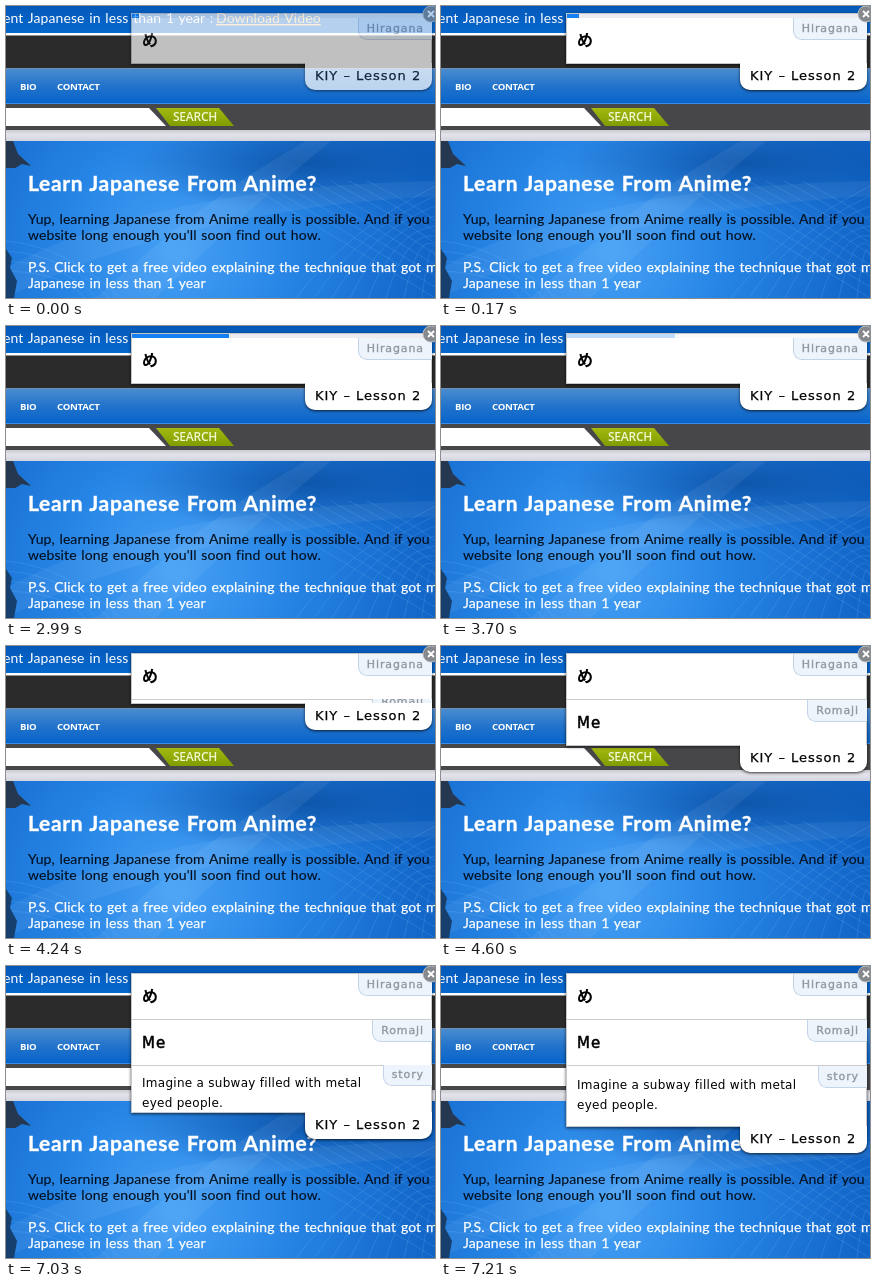
Recreate the animation shown at these times as an HTML page. Size 429x292 px, loop 8 s.

```html
<!DOCTYPE html>
<html lang="en">
<head>
<meta charset="utf-8">
<title>Flashcard popup</title>
<style>
html, body { margin: 0; width: 100%; height: 100%; overflow: hidden; }
#stage { position: relative; width: 429px; height: 292px; overflow: hidden; background: #2b2b2b; }
svg { position: absolute; left: 0; top: 0; }
.body { font: 14px Lato, sans-serif; letter-spacing: .1px; word-spacing: 1px; }
.nav { font: 700 9.6px "Open Sans", sans-serif; letter-spacing: -.25px; }

#popup { position: absolute; left: 125px; top: 7px; width: 301px; font-family: "DejaVu Sans", sans-serif; }
#card { padding: 1px 0 1px 1px; background: #fff; box-shadow: 0 1px 3px #000a, inset 0 0 0 1px #c4c8cc; }
#track { background: #ececf0; }
#bar { height: 100%; background: #1480f2; }
.row { position: relative; overflow: hidden; height: 45px; }
.row + .row { box-shadow: inset 0 1px #ccc; }
.row > div { position: absolute; inset: 0; }
.label { position: absolute; right: 0; top: 0; height: 21px; padding: 0 8px; border: solid #c3d3e8;
  border-width: 0 0 1px 1px; border-radius: 0 0 0 9px; background: #edf4fc; color: #92969e;
  font-size: 11px; line-height: 22px; letter-spacing: .9px; -webkit-text-stroke: .35px; }
.row + .row .label { top: 1px; }
.word { position: absolute; left: 10px; top: 14px; font-size: 15px; line-height: 20px; letter-spacing: 1px; -webkit-text-stroke: .5px; }
.kana { top: 11px; font: 700 16px/20px "Noto Sans CJK JP", "Noto Sans CJK", sans-serif; -webkit-text-stroke: 0; }
.story { position: absolute; left: 10px; top: 10px; font-size: 12px; line-height: 20px; letter-spacing: .28px; white-space: nowrap; }
#tab { position: relative; margin: -1px 0 0 174px; width: 127px; height: 27px; background: #fff; border-radius: 0 0 10px 10px;
  box-shadow: 0 1px 3px #000b; clip-path: inset(0 -5px -5px); box-sizing: border-box; padding-left: 10px;
  font-size: 13px; line-height: 25px; letter-spacing: 1px; white-space: nowrap; -webkit-text-stroke: .25px; }
#close { left: 291px; top: -8px; }
</style>
</head>
<body>
<div id="stage">
  <svg width="429" height="292">
    <defs>
      <linearGradient id="top" x2="0" y2="1"><stop stop-color="#0459b8"/><stop offset="1" stop-color="#0768cf"/></linearGradient>
      <linearGradient id="menu" x2="0" y2="1"><stop stop-color="#4a8bd0"/><stop offset=".5" stop-color="#2273cb"/><stop offset="1" stop-color="#0764cb"/></linearGradient>
      <linearGradient id="strip" x2="0" y2="1"><stop stop-color="#c9c9d0"/><stop offset=".4" stop-color="#e3e3ea"/><stop offset="1" stop-color="#d2d4de"/></linearGradient>
      <linearGradient id="green" x2="0" y2="1"><stop stop-color="#a3b911"/><stop offset="1" stop-color="#7f9c00"/></linearGradient>
      <radialGradient id="sky" gradientUnits="userSpaceOnUse" cx="170" cy="245" r="270">
        <stop stop-color="#45a0f5"/><stop offset=".45" stop-color="#2583e4"/><stop offset="1" stop-color="#0f62c4"/>
      </radialGradient>
      <radialGradient id="shade"><stop stop-color="#084a9c" stop-opacity=".75"/><stop offset="1" stop-color="#084a9c" stop-opacity="0"/></radialGradient>
    </defs>
    <rect width="429" height="27" fill="url(#top)"/>
    <rect y="27" width="429" height="2.5" fill="#fff"/>
    <rect y="63" width="429" height="34" fill="url(#menu)"/>
    <rect y="62" width="429" height="1" fill="#6d8fb5"/>
    <rect y="97" width="429" height="1" fill="#3a8ee6"/>
    <rect y="98" width="429" height="26" fill="#474649"/>
    <path d="M0 102H143L160 120H0Z" fill="#fff"/>
    <path d="M150 102H213L228 120H164Z" fill="url(#green)"/>
    <rect y="124" width="429" height="11" fill="url(#strip)"/>

    <rect y="135" width="429" height="157" fill="url(#sky)"/>
    <svg y="135" width="429" height="157"><ellipse cx="300" cy="22" rx="180" ry="48" fill="url(#shade)"/></svg>
    <g fill="#fff" fill-opacity=".06">
      <path d="M0 262Q150 180 429 175V190Q170 205 0 292Z"/>
      <path d="M90 292Q200 190 300 135H325Q240 205 150 292Z"/>
    </g>
    <g id="arcs" fill="none" stroke="#8cc6ff" stroke-opacity=".17"/>
    <path d="M0 135H7L12 148 25 160 16 158 9 162 0 162Z" fill="#26384f"/>
    <path d="M0 243L6 252 4 262 11 275 8 292H0Z" fill="#173f6e"/>

    <g class="body" fill="#fff">
      <text x="-3" y="17">ent Japanese in less than 1 year :</text>
      <text x="210" y="17" fill="#f6cf8b" text-decoration="underline">Download Video</text>
      <g stroke="#fff" stroke-width=".25">
        <text x="22" y="266">P.S. Click to get a free video explaining the technique that got me</text>
        <text x="22" y="282">Japanese in less than 1 year</text>
      </g>
      <g fill="#04101f" stroke="#04101f" stroke-width=".15">
        <text x="22" y="218">Yup, learning Japanese from Anime really is possible. And if you</text>
        <text x="22" y="234">website long enough you'll soon find out how.</text>
      </g>
      <text x="22" y="185" stroke="#fff" stroke-width=".4" style="font-weight:700;font-size:21px;letter-spacing:.65px">Learn Japanese From Anime?</text>
    </g>
    <g class="nav" fill="#fff">
      <text x="14" y="84">BIO</text>
      <text x="51" y="84">CONTACT</text>
      <text x="167" y="115" fill="#f4f7d2" style="font-weight:600;font-size:12px">SEARCH</text>
    </g>
  </svg>

  <div id="popup">
    <div id="card">
      <div id="track"><div id="bar"></div></div>
      <div class="row"><div><span class="word kana">め</span><span class="label">Hiragana</span></div></div>
      <div class="row" id="romaji"><div><span class="word">Me</span><span class="label">Romaji</span></div></div>
      <div class="row" id="story"><div><span class="story">Imagine a subway filled with metal<br>eyed people.</span><span class="label">story</span></div></div>
    </div>
    <div id="tab">KIY – Lesson 2</div>
    <svg id="close" width="20" height="20">
      <circle cx="9" cy="9" r="8" fill="#85888c" stroke="#b9bcc0"/>
      <path d="M6 6L12 12M12 6L6 12" stroke="#fff" stroke-width="1.8"/>
    </svg>
  </div>
</div>
<script>
const $ = id => document.getElementById(id);
const LOOP = 8000, STEP = 88, SLIDE = 450;
const STARTS = [0, 80, 3430, 4240, 6760];

// Faint nets of curves in the sky panel
let arcs = '';
for (let i = 0; i < 8; i++) {
  arcs += `<path d="M${235 + i * 18} 175Q${320 + i * 14} ${225 - i * 3} 429 ${292 - i * 11}"/>`;
  arcs += `<path d="M${290 + i * 18} 292Q${340 + i * 12} 225 429 ${180 + i * 10}"/>`;
  if (i < 4) arcs += `<path d="M0 ${235 + i * 10}Q60 ${240 + i * 9} ${115 - i * 12} 292"/>`;
}
$('arcs').innerHTML = arcs;

const swing = (t, start) => {
  const x = Math.min(1, Math.max(0, (t - start) / SLIDE));
  return .5 - Math.cos(x * Math.PI) / 2;
};

// The motion advances in short held steps
function held(t) {
  const start = STARTS.findLast(s => s <= t);
  return start + Math.floor((t - start + .01) / STEP) * STEP;
}

function openRow(id, full, p) {
  const row = $(id);
  row.style.height = Math.round(full * p) + 'px';
  row.firstElementChild.style.cssText = `bottom:auto;height:${full}px;transform:translateY(${Math.round(-10 * (1 - p))}px)`;
}

function draw(time) {
  const t = held(time);
  $('popup').style.opacity = t < 80 ? .7 : t < 168 ? .94 : 1;
  $('bar').style.width = 7 + Math.min(t, 3345) * .0303 + 'px';

  // The progress strip fades, then gives up its space
  const gone = swing(t, 3400);
  $('track').style.opacity = 1 - gone;
  $('track').style.height = gone < 1 ? '4px' : 0;

  openRow('romaji', 46, swing(t, 4150));
  openRow('story', 61, swing(t, 6716));
}

const origin = performance.now();
function tick() {
  draw((performance.now() - origin) % LOOP);
  requestAnimationFrame(tick);
}
tick();
</script>
</body>
</html>
```
